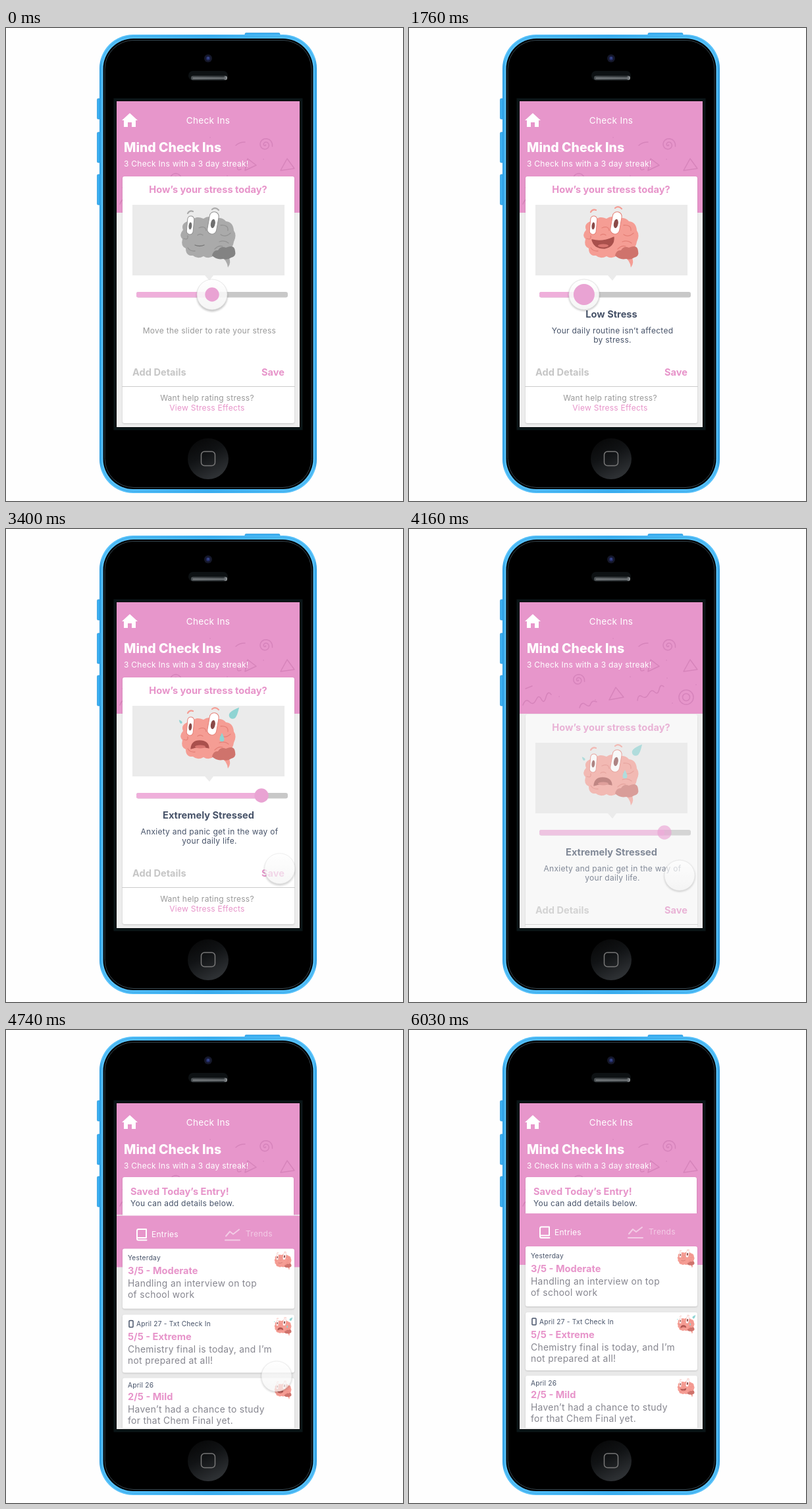
An HTML page that plays this animation: 603 by 717 pixels, repeating every 6.33 s.

```html
<!DOCTYPE html>
<html lang="en">
<head>
<meta charset="utf-8">
<title>Mind Check Ins</title>
<style>
  html, body { margin: 0; width: 100%; height: 100%; overflow: hidden; background: #fefefe; }
  svg { display: block; width: 603px; height: 717px; }
  text { font-family: Inter, "Open Sans", sans-serif; font-size: 12px; letter-spacing: .022em; }
  .bold { font-weight: 700; font-size: 14.6px; letter-spacing: 0; }
  .title { font-weight: 800; font-size: 19.5px; letter-spacing: 0; }
  .nav { font-size: 13.6px; }
  .date { font-size: 10.2px; fill: #475369; }
  .note { font-size: 13.8px; fill: #86868f; letter-spacing: .025em; }
  .mid { text-anchor: middle; }
  .pink { fill: #e794ca; }
  .dark { fill: #475369; }
  .gray { fill: #999; }
  .white { fill: #fff; }
  .line { fill: none; stroke-linecap: round; stroke-linejoin: round; }
  .card { fill: #fff; filter: drop-shadow(0 1px 1px rgba(0, 0, 0, .16)); }
</style>
</head>
<body>
<svg viewBox="0 0 603 717">
  <defs>
    <linearGradient id="blue" x2="1" y2="0">
      <stop offset="0" stop-color="#2394dc"/><stop offset=".012" stop-color="#59c3fb"/>
      <stop offset=".5" stop-color="#3aaef0"/><stop offset=".988" stop-color="#59c3fb"/>
      <stop offset="1" stop-color="#2394dc"/>
    </linearGradient>
    <linearGradient id="homeFill" x2=".5" y2="1">
      <stop offset="0" stop-color="#050505"/><stop offset=".5" stop-color="#111315"/>
      <stop offset="1" stop-color="#2d3033"/>
    </linearGradient>
    <linearGradient id="speaker" x2="1" y2="0">
      <stop offset="0" stop-color="#4a4f52"/><stop offset=".9" stop-color="#383d40"/>
      <stop offset="1" stop-color="#a5aaad"/>
    </linearGradient>
    <linearGradient id="knobFill" x2="0" y2="1">
      <stop offset="0" stop-color="#fff"/><stop offset="1" stop-color="#f4f4f4"/>
    </linearGradient>
    <clipPath id="screen"><path d="M168 111H446V605H168Z"/></clipPath>
    <clipPath id="body"><path d="M168 280H446V603H168Z"/></clipPath>
  </defs>

  <!-- Phone -->
  <g fill="#3aaef0" stroke="#2394dc" stroke-width=".7">
    <rect x="138.500" y="107" width="6" height="31" rx="1.500"/>
    <rect x="138.500" y="158" width="6" height="46" rx="1.500"/>
    <rect x="138.500" y="222" width="6" height="46" rx="1.500"/>
    <rect x="363" y="7.500" width="53" height="6" rx="1.500"/>
  </g>
  <rect x="142" y="10" width="330" height="695" rx="51" fill="url(#blue)"/>
  <rect x="144.500" y="12.500" width="325" height="690" rx="49" fill="none" stroke="#3ba9e8"/>
  <rect x="147.500" y="16" width="319" height="683" rx="46" fill="#000"/>
  <rect x="150" y="18.500" width="314" height="678" rx="44" fill="none" stroke="#36454d"/>
  <circle cx="307" cy="46" r="6" fill="#15182b"/>
  <circle cx="307" cy="46" r="3" fill="#252e6b"/>
  <circle cx="307" cy="45.500" r="1" fill="#4d64a8"/>
  <rect x="277" y="65" width="60" height="14.500" rx="7" fill="#0d1113"/>
  <rect x="281" y="72.500" width="55" height="6.500" rx="3.200" fill="url(#speaker)"/>
  <path class="line" d="M284 76H332" stroke="#a4a9ac"/>
  <circle cx="307" cy="653" r="31" fill="url(#homeFill)"/>
  <rect x="296.500" y="642" width="21" height="21.500" rx="5" fill="none" stroke="#777" stroke-width="1.500"/>
  <rect x="165.500" y="108.500" width="283" height="499" fill="none" stroke="#0a1517" stroke-width="4"/>

  <g clip-path="url(#screen)">
    <rect x="168" y="111" width="278" height="494" fill="#ededed"/>
    <rect x="168" y="111" width="278" height="169" fill="#e796cb"/>
    <g class="line" stroke="#c875ae" stroke-opacity=".55" stroke-width="1.500" id="pattern">
      <path d="M363 216L367 198L380 208ZM417 216L427 198L438 213ZM304 259L314 240L326 255Z"/>
      <path d="M349 178Q354 173 363 173M177 242L187 238M352 210Q350 217 357 214"/>
      <path d="M347 260Q348 250 354 254T364 250T373 247T380 243T387 239"/>
      <path d="M173 267Q177 256 183 262T193 259T201 258T208 255T216 251"/>
      <path d="M259 271Q262 261 268 266T276 265T285 262"/>
      <circle cx="421" cy="255" r="11"/><circle cx="421" cy="255" r="5.500"/>
      <path d="M391 199h.1M283 259h.1M228 254h.1M336 224h.1M392 226h.1M400 264h.1M310 166h.1M436 236h.1"/>
    </g>
    <path class="white" d="M188 129L200 140H197V150H191V143H185V150H179V140H176Z"/>
    <text class="nav mid white" x="307" y="145">Check Ins</text>
    <text class="title white" x="179" y="188">Mind Check Ins</text>
    <text class="white" x="179" y="210">3 Check Ins with a 3 day streak!</text>

    <g id="rating">
      <g id="ratingPage">
        <rect class="card" x="177" y="225" width="261" height="374" rx="3"/>
        <text class="bold mid pink" x="307" y="250">How’s your stress today?</text>
        <path d="M192 268H423V375H315L309 383L302 375H192Z" fill="#ebebeb"/>
        <g id="faces"></g>
        <rect x="198" y="400" width="230" height="8.500" rx="3" fill="#c8c8c8"/>
        <rect id="fill" x="198" y="400" width="115" height="8.500" rx="3" fill="#efafdb"/>
        <text id="level" class="bold mid dark" x="307.500" y="439"></text>
        <text id="line1" class="mid" x="309" y="463"></text>
        <text id="line2" class="mid dark" x="309" y="477"></text>
        <text class="bold" x="192" y="527" fill="#c6c6c6">Add Details</text>
        <text class="bold pink" x="388" y="527">Save</text>
        <path d="M176 543.500H439" stroke="#ccc"/>
        <text class="mid gray" x="305.500" y="565">Want help rating stress?</text>
        <text class="mid pink" x="305.500" y="580">View Stress Effects</text>
      </g>
    </g>

    <g id="saved">
      <rect class="card" x="177" y="223" width="260" height="64" rx="3"/>
      <text class="bold pink" x="189" y="250">Saved Today’s Entry!</text>
      <text class="dark" x="189" y="267">You can add details below.</text>
    </g>

    <g id="panel">
      <rect x="168" y="278" width="278" height="330" fill="#e9e9e9"/>
      <rect x="168" y="278" width="278" height="78" fill="#e796cb"/>
      <g class="line" stroke="#fff" stroke-width="2">
        <path d="M213 311V298.500H201Q199 298.500 199 301V312.500Q199 315 201 315H213.500M199 311.500H213"/>
        <path d="M334 309L340 302L345 306L354 299M333 315H355" opacity=".5"/>
      </g>
      <text class="white" x="221" y="311">Entries</text>
      <text class="white" x="364" y="310" opacity=".5">Trends</text>
      <g id="entries"></g>
    </g>
    <rect x="168" y="603" width="278" height="2" fill="#f0f0f0"/>
  </g>

  <g id="knob">
    <ellipse id="shadow" rx="23.500" ry="23.500" fill="#000" opacity=".26" style="filter:blur(1.500px)"/>
    <circle r="23" fill="url(#knobFill)" stroke="#ddd" stroke-width=".7"/>
  </g>
  <circle id="thumb" cy="404" fill="#e9a3d3"/>
</svg>

<script>
const LOOP = 6330;
const $ = id => document.getElementById(id);
const clamp = v => Math.min(1, Math.max(0, v));
const lerp = (a, b, p) => a + (b - a) * p;
const span = (t, from, to) => clamp((t - from) / (to - from));
const inOut = p => p < .5 ? 2 * p * p : 1 - 2 * (1 - p) ** 2;
const out = (p, power) => 1 - (1 - p) ** power;

const LEVELS = [
  ['', 'Move the slider to rate your stress', ''],
  ['Low Stress', 'Your daily routine isn’t affected', 'by stress.'],
  ['Mild Stress', 'You notice some stress, but it is', 'easy to manage.'],
  ['Moderate Stress', 'Stress is a part of your day, but', 'you can handle it.'],
  ['Very Stressed', 'Stress makes it hard to focus on', 'your daily tasks.'],
  ['Extremely Stressed', 'Anxiety and panic get in the way of', 'your daily life.'],
];

const MOUTHS = [
  'M287 329Q294 332 301 329',
  'M278 321Q294 325 311 317Q312 331 297 334Q281 334 278 321Z',
  'M280 323Q294 327 308 320Q307 331 296 332Q284 332 280 323Z',
  'M285 328Q294 331 303 326',
  'M284 331Q294 324 305 329',
  'M281 333Q282 321 294 321Q307 321 308 332Q295 328 281 333Z',
];

// The brain stands in a box of about 266..350 by 272..362.
function brain(level) {
  const [base, fold, back, mouth] = level
    ? ['#f59d94', '#e58178', '#cf736c', '#a9504c']
    : ['#aaa', '#929292', '#838383', '#777'];
  const open = [1, 2, 5].includes(level);
  const raise = [0, -2, -1, 0, 0, -2][level];
  const drop = (x, y, size, turn) =>
    `<path d="M0 -10C3 -4 5 0 5 4A5 5 0 0 1 -5 4C-5 0 -3 -4 0 -10Z" fill="#8fd4d3"
      transform="translate(${x} ${y}) rotate(${turn}) scale(${size})"/>`;
  const eye = (x, y, w, h, turn) => `<g transform="translate(${x} ${y}) rotate(${turn})">
    <rect x="${-w / 2}" y="${-h / 2}" width="${w}" height="${h}" rx="${w / 2}" fill="#fff" stroke="${fold}"/>
    <ellipse cy="1" rx="${w * .24}" ry="${h * .2}" fill="${level ? '#8a4a48' : '#707070'}"/></g>`;
  return `
    <path d="M326 346Q336 352 337 363Q343 355 338 347Z" fill="${base}"/>
    <path d="M276 293Q265 297 269 306Q262 314 268 320Q265 331 273 334Q273 346 284 345Q291 351 300 346
      Q308 351 316 345L338 338Q345 332 346 324Q351 314 346 307Q345 294 334 293Q328 286 318 289
      Q308 283 300 289Q288 284 284 291Z" fill="${base}"/>
    <path d="M313 345Q315 336 322 337Q326 330 334 333Q347 327 348 338Q350 346 342 348Q337 352 330 350Q320 352 313 345Z"
      fill="${back}"/>
    <g class="line" stroke="${fold}" stroke-width="1.300">
      <path d="M293 303Q303 299 304 307M326 299Q338 298 337 307M341 311Q333 318 326 313M324 324Q332 321 338 326
        M270 319Q277 322 276 315M291 314Q295 311 299 314M317 335Q323 329 329 331M276 333Q280 339 287 338"/>
      <path d="M276 ${281 + raise}Q279 ${276 + raise} 284 ${278 + raise}M313 ${275 + raise}Q318 ${271 + raise} 323 ${276 + raise}"
        stroke="${base}" stroke-width="2.200"/>
      <path d="${MOUTHS[level]}" stroke="${mouth}" fill="${open ? mouth : 'none'}"/>
    </g>
    ${open ? `<ellipse cx="295" cy="330" rx="8" ry="2.500" fill="#d87570"/>` : ''}
    ${eye(280, 299, 10, 28, 5)}${eye(314.5, 295.5, 14, 34, 10)}
    ${level > 3 ? drop(328, 316, .7, 0) : ''}
    ${level > 4 ? drop(347, 279, 1.1, 40) + drop(265, 292, .35, -40) : ''}`;
}

function spiral(cx, cy, r) {
  let d = '';
  for (let a = 0; a < 13; a += .4)
    d += `${d ? 'L' : 'M'}${cx + Math.cos(a) * r * a / 13} ${cy + Math.sin(a) * r * a / 13}`;
  return `<path d="${d}"/>`;
}

const entry = (top, height, date, rating, lines, level, phone) => `
  <rect class="card" x="177" y="${top}" width="261" height="${height}" rx="3"/>
  ${phone ? `<rect class="line" x="187" y="${top + 9}" width="6" height="10" rx="1" stroke="#475369" stroke-width="1.500"/>` : ''}
  <text class="date" x="${phone ? 198 : 185}" y="${top + (phone ? 18 : level === 2 ? 15 : 18)}">${date}</text>
  <text class="bold pink" x="185" y="${top + (level === 2 ? 34 : 38.5)}">${rating}</text>
  ${lines.map((s, i) => `<text class="note" x="185" y="${top + (level === 2 ? 53 : 58) + i * 16.5}">${s}</text>`).join('')}
  <g transform="translate(421 ${top + 18}) scale(.310) translate(-308 -316)">${brain(level)}</g>`;

$('pattern').innerHTML += spiral(394, 177, 11) + spiral(257, 229, 10);
$('faces').innerHTML = LEVELS.map((_, i) => `<g>${brain(i)}</g>`).join('');
$('entries').innerHTML =
  entry(328, 91, 'Yesterday', '3/5 - Moderate', ['Handling an interview on top', 'of school work'], 3) +
  entry(428, 88, 'April 27 - Txt Check In', '5/5 - Extreme', ['Chemistry final is today, and I’m', 'not prepared at all!'], 5, true) +
  entry(524, 90, 'April 26', '2/5 - Mild', ['Haven’t had a chance to study', 'for that Chem Final yet.'], 2);

const move = (el, x, y) => el.setAttribute('transform', `translate(${x} ${y})`);

function sliderX(t) {
  if (t < 770) return lerp(313, 288, inOut(span(t, 120, 710)));
  if (t < 1700) return lerp(288, 264, inOut(span(t, 740, 1280)));
  return lerp(264, 388, inOut(span(t, 1700, 2400)));
}

function levelAt(t, x) {
  if (t < 240) return 0;
  return 1 + [277, 302, 335, 366].filter(limit => x >= limit).length;
}

function drawSlider(t) {
  const x = sliderX(t), level = levelAt(t, x);
  [...$('faces').children].forEach((face, i) => face.style.display = i === level ? '' : 'none');
  const [name, first, second] = LEVELS[level];
  $('level').textContent = name;
  $('line1').textContent = first;
  $('line2').textContent = second;
  $('line1').setAttribute('fill', level ? '#475369' : '#999');
  $('fill').setAttribute('width', x - 198);
  $('thumb').setAttribute('cx', x);
  $('thumb').setAttribute('r', 10.7 + 5.3 * (span(t, 120, 300) - span(t, 2940, 3120)));
}

function drawKnob(t) {
  let x = sliderX(t), y = 404;
  const go = inOut(span(t, 2900, 3600)), back = inOut(span(t, 3600, 3830));
  const leave = inOut(span(t, 5400, 6030));
  x += 33 * go - 10 * back + 235 * leave;
  y += 132 * go - 11 * back + 235 * leave;
  const pressed = span(t, 120, 250) - span(t, 2940, 3100) + span(t, 3960, 4000) - span(t, 4850, 5080);
  move($('knob'), x, y);
  $('knob').setAttribute('opacity', t < 3000 ? .88 : lerp(.88, .68, span(t, 3000, 3300)));
  $('shadow').setAttribute('cy', lerp(2.4, 1.4, pressed));
}

function drawPages(t) {
  const tapped = t >= 4160, shift = tapped ? 56 : 0;
  const fade = tapped ? lerp(.65, 0, span(t, 4160, 4330)) : 1;
  $('rating').setAttribute('clip-path', tapped ? 'url(#body)' : 'none');
  $('rating').setAttribute('opacity', fade);
  move($('ratingPage'), 0, shift);
  move($('thumb'), 0, shift);
  $('thumb').setAttribute('opacity', fade);

  const scale = lerp(.87, 1, out(span(t, 4330, 4740), 3));
  $('saved').setAttribute('opacity', span(t, 4330, 4480));
  $('saved').setAttribute('transform', `translate(307 255) scale(${scale}) translate(-307 -255)`);
  move($('panel'), 0, 327 * (1 - out(span(t, 4489, 4770), 2)));
}

function frame(now) {
  const t = now % LOOP;
  drawSlider(t);
  drawKnob(t);
  drawPages(t);
  requestAnimationFrame(frame);
}
requestAnimationFrame(frame);
</script>
</body>
</html>
```
